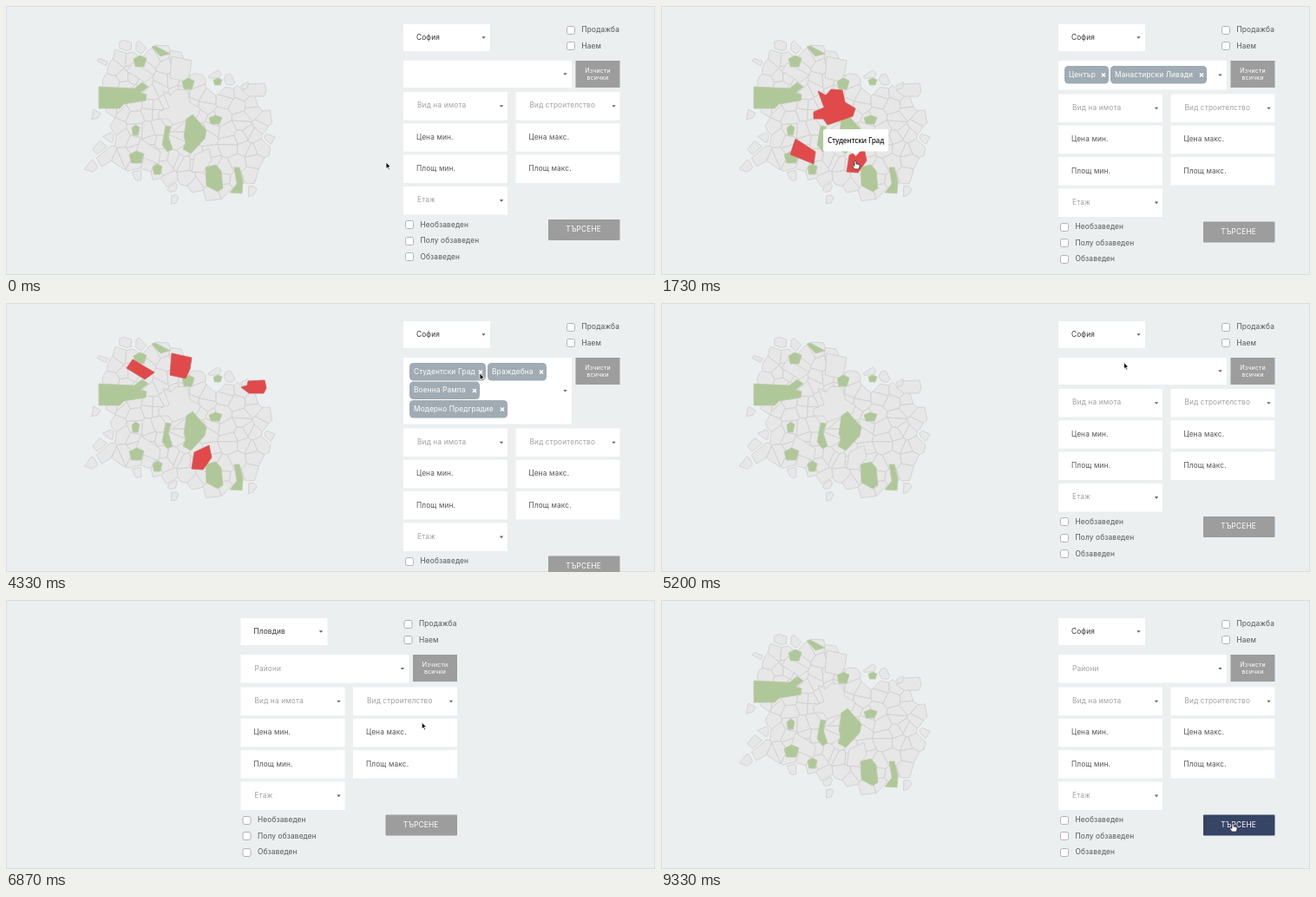
Write an HTML page with a canvas that moves like this. It is 748 px wide and 310 px high and loops after 9400 ms.

```html
<!DOCTYPE html>
<html lang="bg">
<head>
<meta charset="utf-8">
<style>
  html, body { margin: 0; width: 100%; height: 100%; overflow: hidden; background: #ebeff0; }
  canvas { display: block; }
</style>
</head>
<body>
<canvas id="stage" width="748" height="310"></canvas>
<script>
const LOOP = 9400, FRAME = 1000 / 15;
const GREY = '#9d9d9d', RED = '#e04a4a', GREEN = '#b0c899', LAND = '#e7e7e7', BORDER = '#cdcdcd';
const CHOOSE_PLOVDIV = 6670, CHOOSE_SOFIA = 7800;
const ctx = document.getElementById('stage').getContext('2d');
const poly = points => new Path2D('M' + points + 'Z');

// Slanted five-sided patch filling the given box.
const patch = (x, y, w, h) =>
  poly(`${x},${y + h * 0.3} ${x + w * 0.5},${y} ${x + w},${y + h * 0.25} ${x + w * 0.8},${y + h} ${x + w * 0.15},${y + h}`);

const coast = poly('116,62 135,50 192,50 222,90 268,98 306,122 294,165 290,208 225,222 150,188 96,178 122,150 114,100');

const parks = [
  poly('107,93 107,118 131,118 136,113 161,109 162,102 155,100 164,93 157,88 148,95'),
  poly('168,47 172,46 189,55 178,58'),
  poly('208,130 215,125 231,143 229,153 213,170 204,165 207,157 205,150'),
  poly('184,138 190,139 187,150 192,165 186,168 180,160'),
  poly('230,186 242,183 248,190 250,210 244,214 231,207'),
  poly('258,215 266,205 263,186 269,186 273,202 272,216'),
  patch(147, 57, 15, 13), patch(203, 83, 14, 13), patch(239, 83, 10, 8), patch(234, 126, 15, 10),
  patch(145, 137, 9, 12), patch(142, 167, 17, 14), patch(169, 182, 11, 12)
];

// Selectable districts in picking order, with tag width, pointer spot and place in the removal order.
const districts = [
  { name: 'Център', tag: 51, spot: [198, 115], removal: 0,
    path: poly('181,98 190,103 196,96 209,97 212,111 224,118 221,127 192,137 187,130 176,130 176,122 188,117') },
  { name: 'Манастирски Ливади', tag: 111, spot: [163, 167], removal: 1, path: poly('155,153 178,168 176,182 149,171') },
  { name: 'Студентски Град', tag: 88, spot: [224, 178], removal: 2, path: poly('217,172 234,164 237,178 227,192 214,191') },
  { name: 'Враждебна', tag: 68, spot: [285, 97], removal: 3, path: poly('271,97 278,95 279,90 298,89 300,98 297,104 280,104') },
  { name: 'Военна Рампа', tag: 81, spot: [201, 73], removal: 5, path: poly('191,58 214,63 212,76 207,87 189,83') },
  { name: 'Модерно Предградие', tag: 113, spot: [158, 78], removal: 4, path: poly('146,65 171,80 160,88 139,75') }
].map((d, i) => ({ ...d, on: 1000 + i * 430, off: 3880 + d.removal * 230 }));

const tagsAt = t => districts.filter(d => t >= d.on && t < d.off);

function layoutTags(tags) {
  let x = 465, row = 0;
  return tags.map(d => {
    if (x > 465 && x + d.tag > 640) { x = 465; row++; }
    const placed = { d, x, row, y: 69 + row * 21.5, closeX: x + d.tag - 6 };
    x += d.tag + 2;
    return placed;
  });
}

function removalStop(d) {
  const tag = layoutTags(tagsAt(d.off - 1)).find(p => p.d === d);
  return [d.off, tag.closeX - 1, tag.y + 12];
}

// Where the pointer acts: time, x, y.
const stops = [
  [0, 438, 180], [590, 252, 80],
  ...districts.map(d => [d.on, ...d.spot]),
  ...districts.map(removalStop).sort((a, b) => a[0] - b[0]),
  [5530, 520, 38], [6300, 495, 94], [CHOOSE_PLOVDIV, 490, 148], [7270, 320, 38], [CHOOSE_SOFIA, 307, 179],
  [8520, 665, 259], [9450, 659, 257]
];

// The pointer arrives shortly before it acts and rests shortly after.
function pointerAt(t) {
  const i = stops.findIndex(s => s[0] > t);
  const [t0, x0, y0] = stops[i - 1], [t1, x1, y1] = stops[i];
  const begin = Math.max(t0 + 60, t1 - 450), end = t1 - 120;
  const p = Math.min(1, Math.max(0, (t - begin) / (end - begin))), e = p * p * (3 - 2 * p);
  return [x0 + (x1 - x0) * e, y0 + (y1 - y0) * e];
}

function shape(c, path, fill, stroke = BORDER) {
  c.fillStyle = fill;
  c.fill(path);
  c.strokeStyle = stroke;
  c.lineWidth = 0.8;
  c.stroke(path);
}

// Keeps the part of a cell that lies nearer to site a than to site b.
function clipCell(cell, a, b) {
  const side = p => (p[0] - (a[0] + b[0]) / 2) * (b[0] - a[0]) + (p[1] - (a[1] + b[1]) / 2) * (b[1] - a[1]);
  return cell.flatMap((p, i) => {
    const q = cell[(i + 1) % cell.length], sp = side(p), sq = side(q);
    const kept = sp <= 0 ? [p] : [];
    if (sp * sq < 0) {
      const k = sp / (sp - sq);
      kept.push([p[0] + (q[0] - p[0]) * k, p[1] + (q[1] - p[1]) * k]);
    }
    return kept;
  });
}

// Nearest-site cells inside the coast form the city; a few shrunken ones around it are outskirts.
function drawMap() {
  const map = document.createElement('canvas');
  map.width = 748;
  map.height = 310;
  const c = map.getContext('2d');
  let seed = 11;
  const random = () => (seed = seed * 16807 % 2147483647) / 2147483647;
  const sites = [];
  for (let y = 22; y < 262; y += 14)
    for (let x = 66; x < 340; x += 15) sites.push([x + random() * 14, y + random() * 13]);

  c.lineWidth = 34;
  const land = sites.map(a => c.isPointInPath(coast, ...a));
  const near = sites.map(a => c.isPointInStroke(coast, ...a));
  sites.forEach((a, i) => {
    const island = !land[i] && near[i] && random() < 0.3;
    if (!land[i] && !island) return;
    let cell = [[50, 10], [350, 10], [350, 270], [50, 270]];
    for (const b of sites) if (b !== a) cell = clipCell(cell, a, b);
    if (island) cell = cell.map(p => p.map((v, k) => a[k] + (v - a[k]) * 0.65));
    shape(c, poly(cell.join(' ')), LAND);
  });
  districts.forEach(d => shape(c, d.path, LAND));
  parks.forEach(p => shape(c, p, GREEN, '#bccbac'));
  return map;
}
const map = drawMap();

function box(x, y, w, h, fill, radius = 0, stroke) {
  ctx.beginPath();
  ctx.roundRect(x, y, w, h, radius);
  ctx.fillStyle = fill;
  ctx.fill();
  if (stroke) {
    ctx.strokeStyle = stroke;
    ctx.lineWidth = 1;
    ctx.stroke();
  }
}

function text(str, x, y, color = '#555', size = 8.3, align = 'left') {
  ctx.font = `400 ${size}px Inter, sans-serif`;
  ctx.letterSpacing = '0.15px';
  ctx.textAlign = align;
  ctx.textBaseline = 'middle';
  ctx.fillStyle = color;
  ctx.fillText(str, x, y + 0.5);
}

function caret(x, y, up) {
  const d = up ? -1.3 : 1.3;
  ctx.fillStyle = '#666';
  ctx.fill(poly(`${x - 2.2},${y - d} ${x + 2.2},${y - d} ${x},${y + d}`));
}

function field(x, y, label, select) {
  box(x, y, 120, 32.5, '#fff');
  text(label, x + (select ? 16 : 15), y + 15.5, select ? '#a0a0a0' : '#555');
  if (select) caret(x + 113, y + 16.5);
}

function checkbox(x, y, label) {
  box(x + 0.5, Math.round(y) - 4.5, 9, 9, '#fff', 2, '#b0b4b6');
  text(label, x + 17.5, y);
}

function drawTags(placed) {
  for (const { d, x, y, closeX } of placed) {
    box(x, y, d.tag, 20.5, '#a0abb3', 4.5);
    text(d.name, x + 5, y + 10, '#fff');
    ctx.strokeStyle = '#fff';
    ctx.lineWidth = 1.5;
    ctx.stroke(new Path2D(`M${closeX - 2},${y + 8.5}l4,4m0,-4l-4,4`));
  }
}

function drawDropdown(selected, hovered, blink) {
  box(457.5, 51.5, 100, 155, '#fff', 2, '#8c8c8c');
  box(465.5, 57.5, 85, 16, '#fff', 2, '#8c8c8c');
  if (blink) box(470.5, 61, 0.9, 9, '#222');
  ctx.save();
  ctx.beginPath();
  ctx.rect(458, 79, 99, 127);
  ctx.clip();
  ['Бургас, област', 'Ловеч', 'Пловдив', 'София', 'София, област'].forEach((name, i) => {
    const y = 79 + i * 28;
    box(458, y, 99, 27.3, i === hovered ? '#c8cdd6' : i === selected ? '#d8d6d6' : '#fff');
    box(458, y + 27.3, 99, 0.7, '#e6e8e9');
    text(name, 472.5, y + 13);
  });
  ctx.restore();
  box(553, 79, 5, 116, '#9a9a9a', 2);
}

function drawForm(t, tags, x, y) {
  const plovdiv = t >= CHOOSE_PLOVDIV && t < CHOOSE_SOFIA;
  const open = (t >= 5530 && t < CHOOSE_PLOVDIV) || (t >= 7270 && t < CHOOSE_SOFIA);
  const shift = plovdiv ? -187.5 : 0;
  ctx.save();
  ctx.translate(shift, 0);

  box(458, 21, 100, 31, '#fff');
  text(plovdiv ? 'Пловдив' : 'София', 473, 36, '#333');
  caret(550.5, 36.5, open && plovdiv);
  checkbox(646, 27.5, 'Продажба');
  checkbox(646, 46, 'Наем');

  const placed = layoutTags(tags);
  const placeholder = t >= CHOOSE_PLOVDIV;
  const height = placed.length ? 33.5 + placed.at(-1).row * 21.5 : placeholder ? 32.5 : 31;
  box(458, 63, 194, height, '#fff');
  if (placeholder) text('Райони', 474, 79, '#a0a0a0');
  drawTags(placed);
  caret(644.5, 63 + height / 2);
  box(656.5, 63, 51, 31, GREY);
  text('Изчисти', 682, 74, '#fff', 7, 'center');
  text('всички', 682, 82.5, '#fff', 7, 'center');

  const top = 68 + height;
  const rows = [['Вид на имота', 'Вид строителство'], ['Цена мин.', 'Цена макс.'], ['Площ мин.', 'Площ макс.'], ['Етаж']];
  rows.forEach((labels, r) => labels.forEach((label, col) =>
    field(458 + col * 129.5, top + r * 36.3, label, r % 3 === 0)));
  ['Необзаведен', 'Полу обзаведен', 'Обзаведен'].forEach((s, i) => checkbox(460, top + 153 + i * 18.5, s));

  const overButton = x > 625 && x < 708 && y > top + 147 && y < top + 171;
  box(625, top + 147, 82.5, 24, overButton ? '#364466' : GREY, 1);
  text('ТЪРСЕНЕ', 665.5, top + 158.5, '#fff', 8.3, 'center');

  const overList = open && x > 458 + shift && x < 558 + shift && y > 79;
  if (open) drawDropdown(plovdiv ? 2 : 3, overList ? Math.floor((y - 79) / 28) : -1, Math.floor(t / 500) % 2);
  ctx.restore();
  return overButton || overList;
}

function drawTooltip(name, x, y) {
  ctx.font = '600 8.2px "Open Sans", sans-serif';
  ctx.letterSpacing = '-0.2px';
  const w = ctx.measureText(name).width + 10;
  box(x - w / 2 + 0.5, y - 36, w, 25.5, '#fff', 2);
  ctx.fill(poly(`${x - 5},${y - 11} ${x + 6},${y - 11} ${x + 0.5},${y - 5}`));
  ctx.textAlign = 'center';
  ctx.textBaseline = 'middle';
  ctx.fillStyle = '#222';
  ctx.fillText(name, x + 0.5, y - 22.5);
}

const arrow = poly('0,0 0,7.5 1.8,6 3,8.8 4.3,8.2 3.1,5.5 5.3,5.3');
const hand = new Path2D('M-1,1Q0,-.6 1,1V4L4,4.5Q5.4,5 5,7L4,10H-1L-3.4,6.5Q-3.2,5-1,6.4Z');

function drawPointer(x, y, isHand) {
  ctx.save();
  ctx.translate(x, y);
  if (isHand) shape(ctx, hand, '#fff', '#333');
  else shape(ctx, arrow, '#111', '#fff');
  ctx.restore();
}

function draw(now) {
  const t = Math.floor((now % LOOP + 5) / FRAME) * FRAME % LOOP + 4;
  const [x, y] = pointerAt(t);
  const tags = tagsAt(t);
  const hovered = districts.find(d => ctx.isPointInPath(d.path, x, y));

  box(0, 0, 748, 310, '#ebeff0');
  ctx.strokeStyle = '#d9dddf';
  ctx.lineWidth = 1;
  ctx.strokeRect(0.5, 0.5, 747, 309);
  if (t < CHOOSE_PLOVDIV || t >= CHOOSE_SOFIA) {
    ctx.drawImage(map, 0, 0);
    districts.forEach(d => {
      if (d === hovered || tags.includes(d)) shape(ctx, d.path, RED, '#d85a5a');
    });
  }
  const clickable = drawForm(t, tags, x, y);
  if (hovered) drawTooltip(hovered.name, x, y);
  drawPointer(x, y, hovered || clickable);
}

const start = performance.now();
function tick() {
  draw(performance.now() - start);
  requestAnimationFrame(tick);
}
tick();
</script>
</body>
</html>
```
